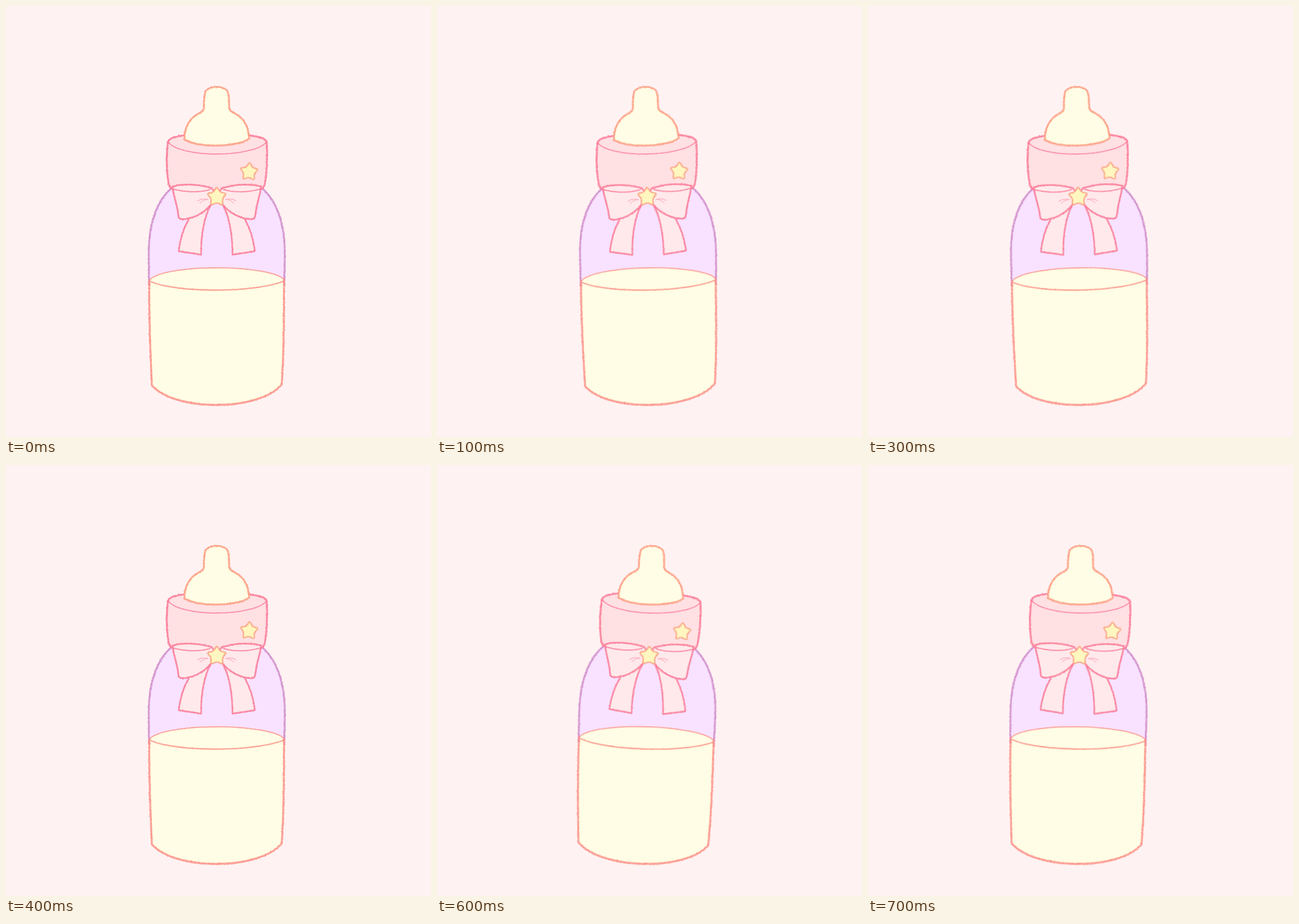
Animation of 743x754 px, one loop 800 ms. Source, as an HTML page with a canvas:

```html
<!DOCTYPE html>
<html>
<head>
<meta charset="utf-8">
<style>
  html, body { margin: 0; width: 100%; height: 100%; overflow: hidden; background: #fff2f2; }
  canvas { display: block; transform-origin: 368.5px 405px; }
</style>
</head>
<body>
<canvas id="bottle" width="743" height="754"></canvas>
<script>
const bottle = document.getElementById('bottle');
const ctx = bottle.getContext('2d');

const PINK = '#fb7896', SALMON = '#fb9187', ORANGE = '#fc9d82', PURPLE = '#cf8ccb';
const CREAM = '#fffde5', BLUSH = '#ffe0e3', BOW = '#ffe9eb';

let seed = 7;
function random() {
  seed = (seed * 16807) % 2147483647;
  return seed / 2147483647;
}

function fill(d, color) {
  ctx.fillStyle = color;
  ctx.fill(new Path2D(d));
}

// Crayon line: a soft core with jittered grains along the path
function crayon(d, color, width = 3.8) {
  const path = document.createElementNS('http://www.w3.org/2000/svg', 'path');
  path.setAttribute('d', d);
  const length = path.getTotalLength();
  ctx.strokeStyle = ctx.fillStyle = color;
  ctx.lineCap = ctx.lineJoin = 'round';
  ctx.lineWidth = width * 0.85;
  ctx.globalAlpha = 0.65;
  ctx.stroke(new Path2D(d));
  for (let s = 0; s < length; s += 0.8) {
    const p = path.getPointAtLength(s);
    const jitter = () => (random() - 0.5) * width * 0.75;
    ctx.globalAlpha = 0.3 + random() * 0.5;
    ctx.beginPath();
    ctx.arc(p.x + jitter(), p.y + jitter(), width * (0.17 + random() * 0.17), 0, 7);
    ctx.fill();
  }
  ctx.globalAlpha = 1;
}

function shape(d, color, line, width) {
  fill(d, color);
  crayon(d, line, width);
}

function mirrored(draw) {
  draw();
  ctx.save();
  ctx.translate(737, 0);
  ctx.scale(-1, 1);
  draw();
  ctx.restore();
}

function star(x, y, size, tilt) {
  const corner = i => {
    const r = size * (i % 2 ? 0.57 : 1.18), a = tilt + (i * Math.PI) / 5 - Math.PI / 2;
    return [x + r * Math.cos(a), y + r * Math.sin(a)];
  };
  const middle = (p, q) => [(p[0] + q[0]) / 2, (p[1] + q[1]) / 2];
  let d = 'M' + middle(corner(9), corner(0));
  for (let i = 0; i < 10; i++) d += 'Q' + corner(i) + ' ' + middle(corner(i), corner(i + 1));
  shape(d + 'Z', '#fff6c0', '#fba585', 3);
}

function drawBody() {
  fill('M288 320C262 343 250 385 250 432V485H487V432C487 385 475 343 449 320Z', '#f8e2ff');
  const surface = 'C259 467 308 458 370 458C427 458 478 467 486 479';
  const walls = 'C486 550 486 600 482 662C462 686 415 698 368 698C320 698 275 686 255 664C252 600 250 550 250.5 480';
  fill('M250.5 480' + surface + walls + 'Z', CREAM);
  crayon('M288 320C262 343 249.500 385 249.500 432L250 488', PURPLE);
  crayon('M449 320C475 343 487.500 385 487.500 432L486.500 488', PURPLE);
  crayon('M251 480' + surface, SALMON, 2.3);
  crayon('M253 482C275 492 320 497 368 497C420 497 465 490 486 481', SALMON, 2.8);
  crayon('M486 479' + walls, SALMON, 4);
}

function drawCap() {
  const left = 'M313 226C299 228 286 230 283 238C280 262 281 288 283 303C284 312 286 317 290 320';
  fill(left + 'H447C454 312 457 262 456 238C450 229 438 227 425 226Z', BLUSH);
  crayon(left, PINK);
  crayon('M424 226C438 228 453 230 456 238C457 262 456 288 454 303C453 312 451 317 447 320', PINK);
  crayon('M284 238C292 251 330 259 368 259C406 259 446 251 455 238', PINK, 2.2);
  const teat = 'M312 233C312 212 321 196 337 188C345 184 346 182 346 174C346 165 346 159 348 152'
    + 'C351 138 386 138 388 152C390 159 390 165 390 174C390 182 392 184 400 188'
    + 'C416 196 424 210 425 232C405 247.500 332 248.500 312 233Z';
  shape(teat, CREAM, ORANGE);
  star(425, 290, 15.5, 0.06);
}

function drawBow() {
  mirrored(() => {
    const tail = 'M319 374C310 390 304 410 302 429L341 435C341 410 344 375 357 350';
    fill(tail + 'L340 360Z', BOW);
    crayon(tail, PINK, 3.3);
  });
  mirrored(() => {
    shape('M291 316C308 310 340 312 360 319L369 333L357 349C345 363 325 373 308 373C301 373 302 369 300 358C298 344 293 332 291 316Z', BOW, PINK, 3.5);
    crayon('M292 320C312 326 338 327 357 321', PINK, 2.3);
    crayon('M335 341C341 337 347 337 353 339', '#fb96aa', 1.5);
    crayon('M339 345C343 340 348 339 353 338', '#fb96aa', 1.3);
  });
  star(368.5, 334, 16.5, 0);
}

drawBody();
drawCap();
drawBow();

// Rocks left and right in eight held poses
function frame(now) {
  const step = Math.floor(now / 100) % 8;
  const tilt = Math.abs((step + 2) % 8 - 4) - 2;
  bottle.style.transform = `rotate(${tilt * 0.0152}rad)`;
  requestAnimationFrame(frame);
}
requestAnimationFrame(frame);
</script>
</body>
</html>
```
